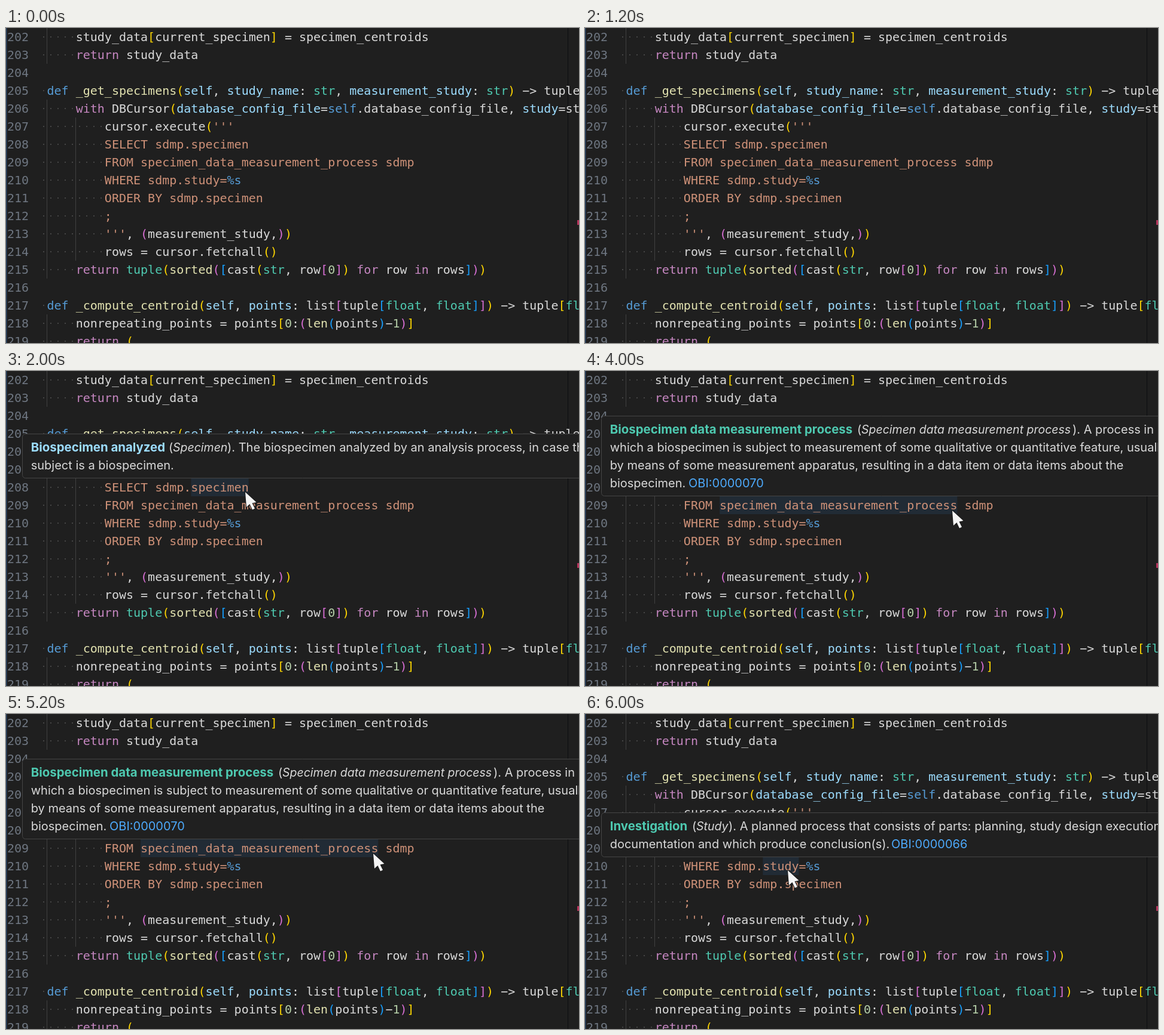
An HTML page with a canvas that plays this animation: 958 px wide and 528 px high, repeating every 8 s.

```html
<!DOCTYPE html>
<html lang="en">
<head>
<meta charset="utf-8">
<title>Editor hover hints</title>
<style>
  html, body { margin: 0; width: 100%; height: 100%; overflow: hidden; background: #1f1f1f; }
  canvas { display: block; }
</style>
</head>
<body>
<canvas id="stage" width="958" height="528"></canvas>
<script>
const ctx = document.getElementById('stage').getContext('2d');
const W = 958, H = 528, ROW = 30, LEFT = 56.5, FIRST = 202, HOLD = 2000;
const MONO = '20px "DejaVu Sans Mono", monospace';
const SANS = {
  plain: '20px Inter, sans-serif',
  bold: 'bold 20.4px Inter, sans-serif',
  italic: 'italic 19.5px Inter, sans-serif'
};

const INK = {
  w: '#d9d9d9', k: '#569cd6', c: '#c586c0', f: '#e2e2b0', v: '#9cdcfe',
  t: '#4ec9b0', s: '#ce9178', n: '#b5cea8',
  1: '#ffd700', 2: '#da70d6', 3: '#179fff', link: '#4daafc'
};

// Each line: indent, then pairs of ink and text
const CODE = [
  [5, 'w', 'study_data', 1, '[', 'w', 'current_specimen', 1, ']', 'w', ' = specimen_centroids'],
  [5, 'c', 'return', 'w', ' study_data'],
  [0],
  [1, 'k', 'def ', 'f', '_get_specimens', 1, '(', 'v', 'self', 'w', ', ', 'v', 'study_name', 'w', ': ',
    't', 'str', 'w', ', ', 'v', 'measurement_study', 'w', ': ', 't', 'str', 1, ')', 'w', ' −> tuple'],
  [5, 'c', 'with', 'w', ' DBCursor', 1, '(', 'v', 'database_config_file', 'w', '=', 'k', 'self',
    'w', '.database_config_file, ', 'v', 'study', 'w', '=study_name'],
  [9, 'w', 'cursor.execute', 1, '(', 's', "'''"],
  [9, 's', 'SELECT sdmp.specimen'],
  [9, 's', 'FROM specimen_data_measurement_process sdmp'],
  [9, 's', 'WHERE sdmp.study=', 'k', '%s'],
  [9, 's', 'ORDER BY sdmp.specimen'],
  [9, 's', ';'],
  [9, 's', "'''", 'w', ', ', 2, '(', 'w', 'measurement_study,', 2, ')', 1, ')'],
  [9, 'w', 'rows = cursor.fetchall', 1, '()'],
  [5, 'c', 'return ', 't', 'tuple', 1, '(', 'f', 'sorted', 2, '(', 3, '[', 'w', 'cast', 1, '(',
    't', 'str', 'w', ', row', 2, '[', 'n', '0', 2, ']', 1, ')', 'c', ' for', 'w', ' row', 'c', ' in',
    'w', ' rows', 3, ']', 2, ')', 1, ')'],
  [0],
  [1, 'k', 'def ', 'f', '_compute_centroid', 1, '(', 'v', 'self', 'w', ', ', 'v', 'points', 'w', ': list',
    2, '[', 'w', 'tuple', 3, '[', 't', 'float', 'w', ', ', 't', 'float', 3, ']', 2, ']', 1, ')',
    'w', ' −> tuple', 1, '[', 't', 'float'],
  [5, 'w', 'nonrepeating_points = points', 1, '[', 'n', '0', 'w', ':', 2, '(', 'f', 'len', 3, '(',
    'w', 'points', 3, ')', 'w', '−', 'n', '1', 2, ')', 1, ']'],
  [5, 'c', 'return', 1, ' (']
];

// Text runs: x, ink, style, text
const EDGE = 41.7;
const HINTS = [
  null,
  {
    top: 105, word: [21, 8, 208], tip: [400, 203],
    lines: [
      [[EDGE, 'v', 'bold', 'Biospecimen analyzed'], [272, 'w', 'plain', '('], [279, 'w', 'italic', 'Specimen'],
        [370, 'w', 'plain', '). The biospecimen analyzed by an analysis process, in case the']],
      [[EDGE, 'w', 'plain', 'subject is a biospecimen.']]
    ]
  },
  {
    top: 75, word: [14, 33, 209], tip: [614, 234],
    lines: [
      [[EDGE, 't', 'bold', 'Biospecimen data measurement process'], [455, 'w', 'plain', '('],
        [462, 'w', 'italic', 'Specimen data measurement process'], [815, 'w', 'plain', '). A process in']],
      [[EDGE, 'w', 'plain', 'which a biospecimen is subject to measurement of some qualitative or quantitative feature, usually']],
      [[EDGE, 'w', 'plain', 'by means of some measurement apparatus, resulting in a data item or data items about the']],
      [[EDGE, 'w', 'plain', 'biospecimen.'], [173, 'link', 'plain', 'OBI:0000070']]
    ]
  },
  {
    top: 165, word: [20, 5, 210], tip: [339, 262],
    lines: [
      [[EDGE, 't', 'bold', 'Investigation'], [179, 'w', 'plain', '('], [186, 'w', 'italic', 'Study'],
        [240, 'w', 'plain', '). A planned process that consists of parts: planning, study design execution,']],
      [[EDGE, 'w', 'plain', 'documentation and which produce conclusion(s).'], [512, 'link', 'plain', 'OBI:0000066']]
    ]
  }
];

ctx.font = MONO;
const CELL = ctx.measureText('0').width;
const colX = col => LEFT + col * CELL;

function box(x, y, w, h, color) {
  ctx.fillStyle = color;
  ctx.fillRect(x, y, w, h);
}

function text(str, x, y, color) {
  ctx.fillStyle = color;
  ctx.fillText(str, x, y);
}

function guide(x, from, to) {
  box(x, (from - FIRST) * ROW, 1, (to - from + 1) * ROW, '#404040');
}

function drawCode() {
  ctx.font = MONO;
  CODE.forEach(([indent, ...runs], i) => {
    const y = i * ROW;
    text(String(FIRST + i), 2, y + 22, '#6e7681');
    for (let c = 0; c < indent; c++) box(Math.round(colX(c + 0.5)) - 1, y + 14, 2, 2, '#454545');
    let col = indent;
    for (let r = 0; r < runs.length; r += 2) {
      text(runs[r + 1], colX(col), y + 22, INK[runs[r]]);
      col += runs[r + 1].length;
    }
  });
}

function drawHint({ top, lines }) {
  ctx.beginPath();
  ctx.roundRect(27.5, top + 0.5, W, lines.length * ROW + 14, 5);
  ctx.fillStyle = '#202020';
  ctx.fill();
  ctx.strokeStyle = '#454545';
  ctx.lineWidth = 1;
  ctx.stroke();
  lines.forEach((runs, i) => {
    for (const [x, ink, style, str] of runs) {
      ctx.font = SANS[style];
      text(str, x, top + 30 + i * ROW, INK[ink]);
    }
  });
}

function drawPointer([x, y]) {
  const shape = [[0, 0], [2, 25], [7.5, 20], [12, 29.5], [16, 27.5], [11.5, 18.5], [18.5, 17]];
  ctx.beginPath();
  for (const [dx, dy] of shape) ctx.lineTo(x + dx, y + dy);
  ctx.closePath();
  ctx.lineJoin = 'round';
  ctx.lineWidth = 2;
  ctx.strokeStyle = '#1a1a1a';
  ctx.stroke();
  ctx.fillStyle = '#f4f4f4';
  ctx.fill();
}

function draw(step) {
  const hint = HINTS[step];
  box(0, 0, W, H, '#1f1f1f');
  box(0, 0, 1.5, H, '#2a4464');
  box(939, 0, 1, H, '#0c0d10');
  if (hint) {
    const [col, len, line] = hint.word;
    box(colX(col), (line - FIRST) * ROW, len * CELL, ROW, '#212b35');
  }
  guide(68, 202, 203);
  guide(68, 206, 215);
  guide(116, 207, 214);
  guide(68, 218, 219);
  drawCode();
  box(955, 322, 3, 8, '#b5345c');
  if (hint) {
    drawHint(hint);
    drawPointer(hint.tip);
  }
}

const start = performance.now();
function tick() {
  const t = performance.now() - start;
  draw(Math.floor(t / HOLD) % HINTS.length);
  requestAnimationFrame(tick);
}
tick();
</script>
</body>
</html>
```
